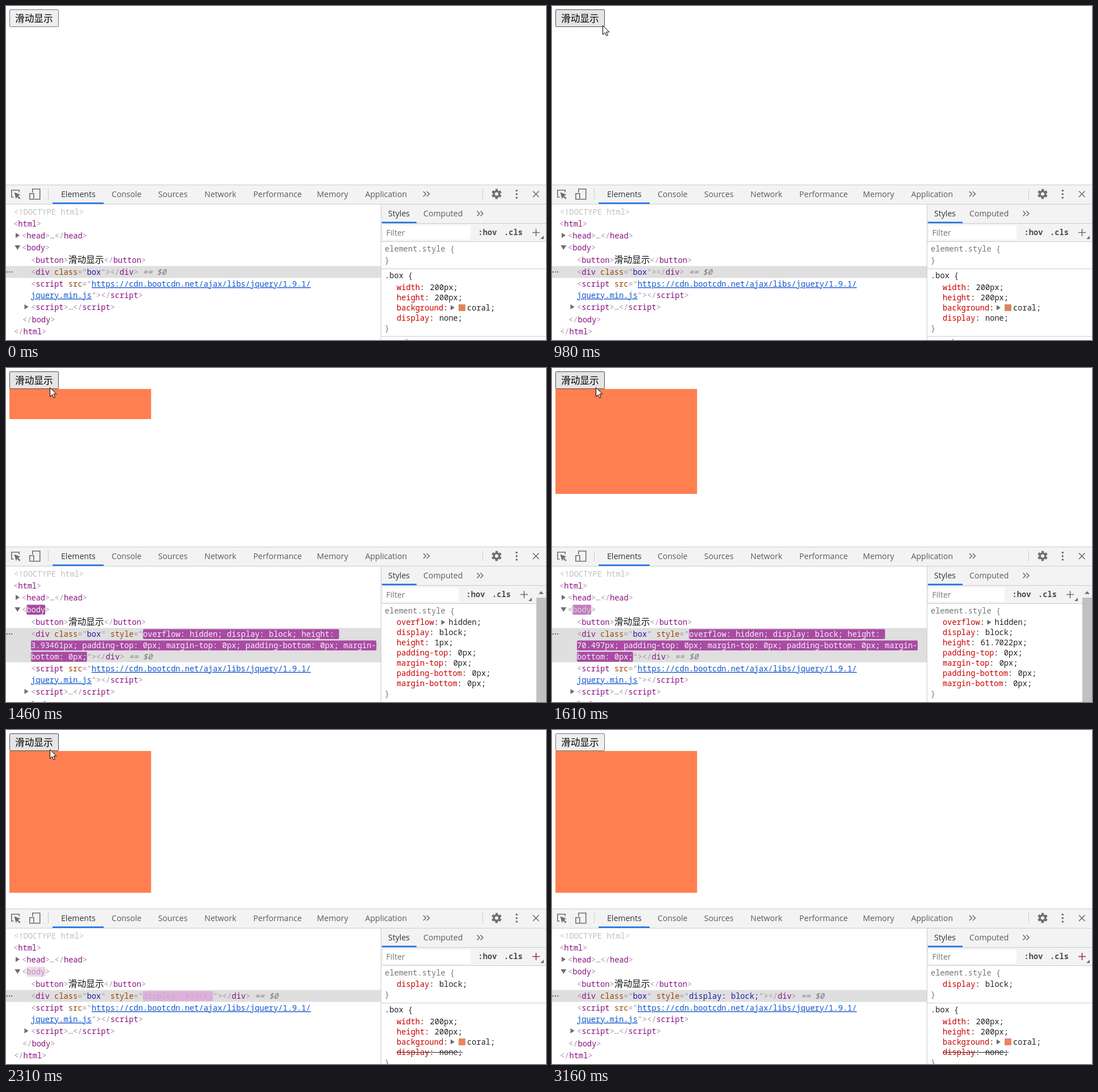
Write an HTML page that moves like this. It is 951 by 589 pixels and loops after 3920 ms.

```html
<!DOCTYPE html>
<html lang="zh-CN">
<head>
<meta charset="utf-8">
<title>滑动显示</title>
<style>
html, body { margin: 0; width: 100%; height: 100%; overflow: hidden; background: #fff; }
svg { display: block; width: 951px; height: 589px; }
text { white-space: pre; font: 13.7px "Noto Sans Mono", "Noto Sans CJK SC", "Noto Sans CJK", monospace; fill: #a894a6; }
.ui { font: 14.1px "Open Sans", "Noto Sans", sans-serif; fill: #5a5a5a; }
.on { fill: #333; }
.hint { fill: #757575; }
.tool { font-weight: 600; fill: #4a4a4a; }
.label { font: 16.67px "Noto Sans CJK SC", "Noto Sans CJK", sans-serif; fill: #000; }
.doc { fill: #c0c0c0; }
.t { fill: #881280; }
.a { fill: #994500; }
.v { fill: #1a1aa6; }
.l { fill: #1155cc; text-decoration: underline; }
.i { fill: #777; font-style: italic; }
.k { fill: #111; font-size: 15.7px; }
.p { fill: #c80000; }
.css { fill: #222; }
.gray { fill: #6e6e6e; }
.white { fill: #fff; }
.bar { fill: #f3f3f3; }
.row { fill: #dfdfdf; }
.track { fill: #f1f1f1; }
.thumb { fill: #c1c1c1; }
.coral { fill: #ff7f50; }
.swatch { stroke: rgba(128, 128, 128, .6); }
.edge { fill: none; stroke: #ccc; }
.accent { fill: #1a73e8; }
.icon { fill: none; stroke: #6e6e6e; stroke-width: 1.6; }
.strike { stroke: #222; }
.flash { rx: 2px; }
</style>
</head>
<body>
<svg id="stage" viewBox="0 0 951 589"></svg>
<script>
const LOOP = 3920, CHAR = 8.22;
const stage = document.getElementById('stage');

// {c:text} marks a run of text with class c
const mark = s => s.replace(/&/g, '&amp;').replace(/</g, '&lt;')
  .replace(/\{(\w):([^}]*)\}/g, '<tspan class="$1">$2</tspan>');
const text = (x, y, s, cls = '', id = '') =>
  `<text x="${x}" y="${y}" class="${cls}" id="${id}">${mark(s)}</text>`;
const rect = (x, y, w, h, cls, id = '') =>
  `<rect x="${x}" y="${y}" width="${w}" height="${h}" class="${cls}" id="${id}"/>`;
const path = (d, cls, id = '') => `<path d="${d}" class="${cls}" id="${id}"/>`;
const group = (id, ...parts) => `<g id="${id}">${parts.join('')}</g>`;
const right = (x, y) => path(`M${x} ${y - 4.5}l7 4.5-7 4.5z`, 'gray');
const chevrons = (x, y) => path(`M${x} ${y - 4.5}l4.5 4.5-4.5 4.5m6-9l4.5 4.5-4.5 4.5`, 'icon');

// One CSS declaration; the value sits a pixel further than the plain grid
const prop = (y, name, value, id = '') =>
  text(688, y, `{p:${name}}:`, 'css') +
  text(689 + (name.length + 2) * CHAR, y, value + ';', 'css', id);
const flashRect = (x, y, chars, id = '') => rect(x, y, chars * CHAR, 17.5, 'flash hot', id);

const tabs = [['Elements', 97], ['Console', 186], ['Sources', 268], ['Network', 349.5],
  ['Performance', 435.5], ['Memory', 547.5], ['Application', 632.5]];

const page = group('page',
  rect(6, 37, 249.5, 0, 'coral', 'box'),
  '<rect id="button" x="6.5" y="6.5" width="86" height="30" rx="1.5"/>',
  text(16, 28, '滑动显示', 'label'));

const gear = `<g fill="none" stroke="#6e6e6e" transform="translate(864 331.5) rotate(-90)">
  <circle r="4.8" stroke-width="3.6"/>
  <circle r="7.3" stroke-width="3.2" stroke-dasharray="4.2 3.44" stroke-dashoffset="2.1"/></g>`;

const toolbar = group('toolbar',
  rect(0, 315, 951, 274, 'white'),
  rect(0, 315, 951, 34, 'bar'),
  path('M0 315.5H951M0 349.5H951M74.5 322V341M839.5 322V341', 'edge'),
  path('M13.5 337H9.8V324.8H23.2V328.5', 'icon'),
  path('M14.5 328.5l10.8 4.2-4 2 4.2 4.3-1.7 1.7-4.3-4.3-1.8 4z', 'gray'),
  path('M46.8 329V322.8H59.7V340.7H50', 'icon'),
  path('M41.8 330.8h7v9.9h-7z', 'icon'),
  ...tabs.map(([s, x], i) => text(x, 337, s, i ? 'ui' : 'ui on')),
  rect(82, 346.5, 90, 2.5, 'accent'),
  chevrons(735, 331.5),
  gear,
  ...[325.5, 331.7, 338].map(y => `<circle cx="899.3" cy="${y}" r="1.8" class="gray"/>`),
  path('M928 326.5l10.5 10.5m0-10.5l-10.5 10.5', 'icon'));

const tree = group('tree',
  rect(0, 458.5, 660, 21, 'row', 'row'),
  ...[1.8, 6, 10.2].map(x => `<circle cx="${x}" cy="469" r="1.2" class="gray"/>`),
  text(14, 368, '<!DOCTYPE html>', 'doc'),
  text(13, 389, '<{t:html}>'),
  right(17, 404.5),
  text(28, 410, '<{t:head}>…</{t:head}>'),
  path('M15.3 422h10l-5 8z', 'gray'),
  rect(28 + CHAR, 417.5, 4 * CHAR, 17.5, 'flash', 'bodyFlash'),
  text(28, 431, '<'),
  text(28 + CHAR, 431, 'body', 't', 'bodyName'),
  text(28 + 5 * CHAR, 431, '>'),
  text(44, 453, '<{t:button}>{k:滑动显示}</{t:button}>'),
  group('tail',
    text(44, 495, '<{t:script} {a:src}="{l:https://cdn.bootcdn.net/ajax/libs/jquery/1.9.1/}'),
    text(44, 515, '{l:jquery.min.js}"></{t:script}>'),
    right(32.5, 530.5),
    text(44, 536, '<{t:script}>…</{t:script}>'),
    text(29, 558, '</{t:body}>'),
    text(14, 579, '</{t:html}>')));

const styles = group('styles',
  rect(660, 350, 291, 66, 'bar'),
  path('M660.5 349V589M661 383.5H951M661 415.5H951', 'edge'),
  text(673, 371, 'Styles', 'ui on'),
  text(735, 371, 'Computed', 'ui'),
  rect(662, 380.5, 61, 2.5, 'accent'),
  chevrons(829.5, 366),
  rect(664, 387, 154, 25, 'white', 'filter'),
  text(669.5, 405, 'Filter', 'ui hint'),
  group('tools',
    text(831.5, 404, ':hov', 'tool'),
    text(877, 404, '.cls', 'tool'),
    path('M927 399.5h13m-6.5-6.5v13', 'icon', 'plus'),
    path('M947 405v6h-6z', 'gray')),
  text(667, 433, 'element.style {', 'hint'),
  group('rule',
    path('M661 463.5H951M661 582.5H951', 'edge'),
    text(667, 480, '.box {', 'css'),
    prop(501, 'width', '200px'),
    prop(519, 'height', '200px'),
    text(688, 537, '{p:background}:', 'css'),
    right(783, 532),
    rect(797.5, 526.5, 11, 11, 'swatch', 'swatch'),
    text(812, 537, 'coral;', 'css'),
    prop(555, 'display', 'none'),
    path('M688 550.5H804', 'strike', 'strike'),
    text(667, 573, '}', 'hint')));

const divHead = '<{t:div} {a:class}="{v:box}"';
const divTail = '"></{t:div}>{i: == $0}';
const openX = 44 + 24 * CHAR;

const idle = group('idle',
  text(44, 474, divHead + '></{t:div}>{i: == $0}'),
  text(667, 453, '}', 'hint'),
  rect(704, 588, 3, 1, 'gray'));

const slide = group('slide',
  text(44, 474, divHead + ' {a:style}="'),
  flashRect(openX, 460.5, 42),
  flashRect(44, 480.5, 74, 'midFlash'),
  flashRect(44, 500.5, 12),
  text(openX, 474, 'overflow: hidden; display: block; height: ', 'hotText'),
  text(44, 494, '', 'hotText', 'midText'),
  text(44, 514, 'bottom: 0px;', 'hotText'),
  text(44 + 12 * CHAR, 514, divTail),
  text(688, 453, '{p:overflow}:', 'css'),
  right(766.5, 448.5),
  text(779.5, 453, 'hidden;', 'css'),
  prop(471, 'display', 'block'),
  prop(489, 'height', '1px', 'cssHeight'),
  ...['padding-top', 'margin-top', 'padding-bottom', 'margin-bottom']
    .map((name, i) => prop(507 + 18 * i, name, '0px')),
  text(667, 579, '}', 'hint'),
  rect(934, 384, 17, 205, 'track'),
  rect(934, 405, 17, 184, 'thumb'),
  path('M938 398.5l4.5-5 4.5 5z', 'gray'));

const done = group('done',
  text(44, 474, divHead + ' {a:style}="'),
  flashRect(openX, 460.5, 15),
  text(openX, 474, 'display: block;', 'hotText'),
  text(openX + 15 * CHAR, 474, divTail),
  prop(453, 'display', 'block'),
  text(667, 471, '}', 'hint'));

const cursor = '<path id="cursor" d="M.5 .5V16.5L4.3 12.9 6.8 18.6 9.3 17.5 6.8 11.9H11.8Z" fill="#fff" stroke="#000"/>';

stage.innerHTML = page + toolbar + tree + styles + idle + slide + done + cursor;

const el = id => document.getElementById(id);
const set = (id, attrs) => { for (const k in attrs) el(id).setAttribute(k, attrs[k]); };
const show = (id, on) => { el(id).style.display = on ? '' : 'none'; };
const clamp = p => Math.min(1, Math.max(0, p));
const smooth = p => p * p * (3 - 2 * p);
const mix = (a, b, p) => `rgb(${a.map((v, i) => Math.round(v + (b[i] - v) * p))})`;

// cubic-bezier(0, 0, .2, 1)
function ease(p) {
  let lo = 0, hi = 1;
  for (let i = 0; i < 24; i++) {
    const s = (lo + hi) / 2;
    if (.6 * (1 - s) * s * s + s ** 3 < p) lo = s; else hi = s;
  }
  return 3 * (1 - lo) * lo * lo + lo ** 3;
}

// Update highlight of the element tree: 1.4 s, pale at 80 %
const STRONG = [158, 54, 153], PALE = [245, 219, 244], MUTED = [168, 148, 166], WHITE = [255, 255, 255];
function flash(age, own) {
  if (age < 0 || age >= 1400) return { bg: 'none', fg: mix(own, own, 0), alpha: 0 };
  if (age < 1120) {
    const e = ease(age / 1120);
    return { bg: mix(STRONG, PALE, e), fg: mix(WHITE, MUTED, e), alpha: 1 };
  }
  const e = ease((age - 1120) / 280);
  return { bg: mix(PALE, PALE, 0), fg: mix(MUTED, own, e), alpha: 1 - e };
}
function fillRect(node, look) {
  node.style.fill = look.bg;
  node.style.fillOpacity = look.alpha;
}

// Screen refreshes: start, end, count
const stamps = [0];
for (const [a, b, n] of [[430, 900, 7], [980, 1460, 7], [1530, 2010, 7],
  [2090, 2390, 5], [2540, 3000, 7], [3080, 3160, 2]])
  for (let i = 0; i < n; i++) stamps.push(Math.round(a + (b - a) * i / (n - 1)));

// Heights the panels report while sliding: time, tree, styles
const reports = [[1460, '3.93461', '1'], [1530, '25.8317', '19.0983'], [1610, '70.497', '61.7022'],
  [1690, '134.481', '126.034'], [1770, '180.902', '174.263']];

function cursorAt(t) {
  if (t < 980) {
    const q = 1 - (1 - (t - 430) / 550) ** 1.8;
    return [732 - 643 * q, 70 - 115.7 * q + 79.7 * q * q];
  }
  if (t < 2540) return [89 - 12 * smooth(clamp((t - 980) / 180)), 34];
  const q = smooth(clamp((t - 2460) / 540));
  return [77 + 743 * q, 34 - 203.4 * q + 313.4 * q * q];
}

function draw(t) {
  const sliding = t >= 1460 && t < 1850, finished = t >= 1850;
  show('idle', !sliding && !finished);
  show('slide', sliding);
  show('done', finished);
  show('rule', !sliding);
  show('strike', finished);

  const p = clamp((t - 1331) / 423);
  set('box', { height: 250 * (.5 - Math.cos(Math.PI * p) / 2) });

  const hover = t >= 980 && t < 2540, pressed = t >= 1220 && t < 1331;
  set('button', {
    fill: pressed ? '#f5f5f5' : hover ? '#e5e5e5' : '#efefef',
    stroke: pressed ? '#8d8d8d' : hover ? '#4f4f4f' : '#767676'
  });

  show('cursor', t >= 430 && t < 3080);
  const [x, y] = cursorAt(t);
  set('cursor', { transform: `translate(${Math.round(x)} ${Math.round(y)})` });

  set('row', { height: sliding ? 60.5 : 21 });
  set('tail', { transform: `translate(0 ${sliding ? 40 : 0})` });
  set('rule', { transform: `translate(0 ${finished ? 18 : 0})` });
  set('tools', { transform: `translate(${sliding ? -21 : 0} 0)` });
  set('filter', { width: sliding ? 133 : 154 });
  set('swatch', { fill: finished ? '#ff7f50' : '#e8844a' });
  el('plus').style.stroke = finished ? '#a03040' : '';

  if (sliding) {
    const [, inTree, inStyles] = reports.filter(r => r[0] <= t).pop();
    const mid = inTree + 'px; padding-top: 0px; margin-top: 0px; padding-bottom: 0px; margin-';
    el('midText').textContent = mid;
    set('midFlash', { width: mid.length * CHAR });
    el('cssHeight').textContent = inStyles + 'px;';
  }

  const body = flash(t - 1430, [136, 18, 128]);
  fillRect(el('bodyFlash'), body);
  el('bodyName').style.fill = body.fg;

  // While sliding every height update restarts the highlight
  const hot = flash(sliding ? 38 : t - 1805, [26, 26, 166]);
  stage.querySelectorAll('.hot').forEach(n => fillRect(n, hot));
  stage.querySelectorAll('.hotText').forEach(n => { n.style.fill = hot.fg; });
}

const start = performance.now();
let last = -1;
function tick() {
  const t = (performance.now() - start) % LOOP;
  const now = stamps.filter(s => s <= t).pop();
  if (now !== last) draw(last = now);
  requestAnimationFrame(tick);
}
tick();
</script>
</body>
</html>
```
